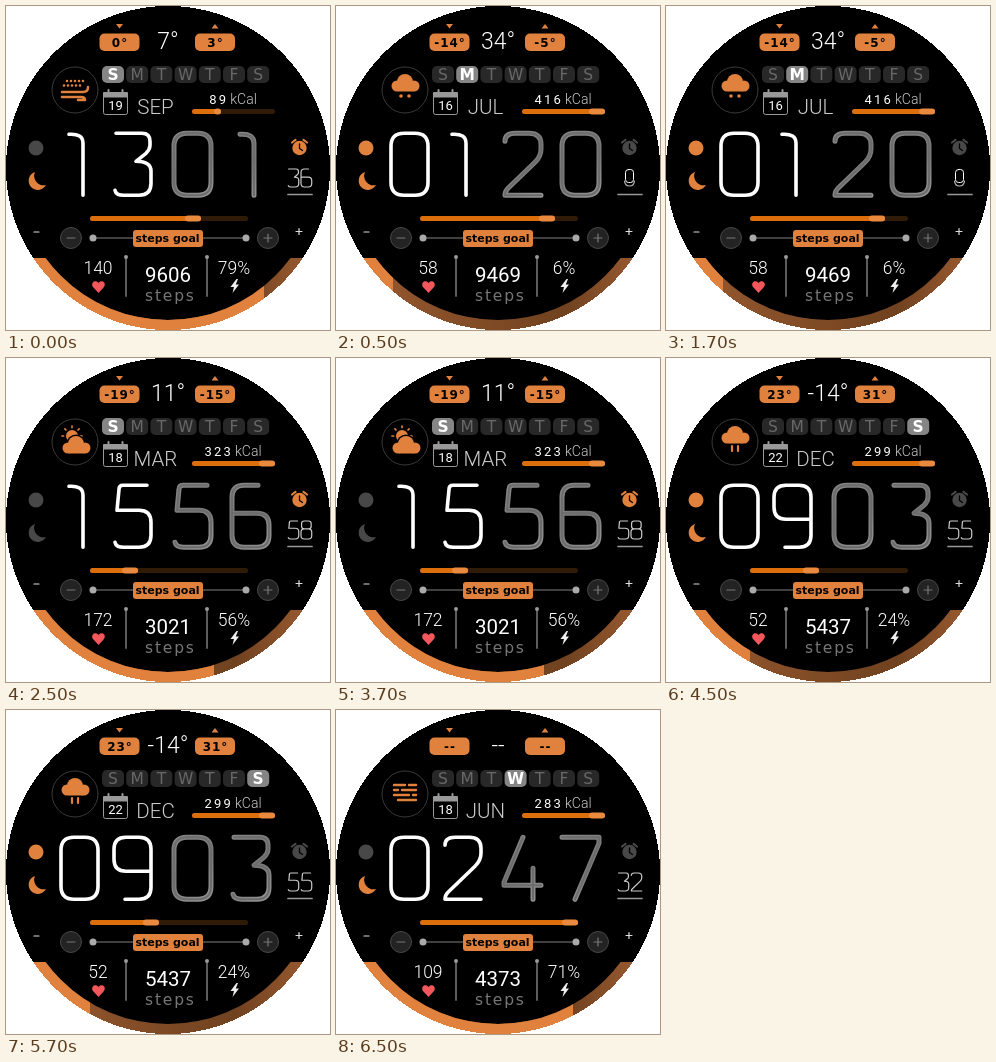
Animation, 324 px wide and 324 px high, one loop 8 s. Source, as an HTML page with a canvas:

```html
<!DOCTYPE html>
<html lang="en">
<head>
<meta charset="utf-8">
<title>Watch face</title>
<style>
html, body { margin: 0; width: 100%; height: 100%; overflow: hidden; background: #fff; }
canvas { display: block; width: 324px; height: 324px; }
</style>
</head>
<body>
<canvas id="face" width="324" height="324"></canvas>
<script>
const ctx = document.getElementById('face').getContext('2d');
const ORANGE = '#e0813d', DEEP = '#dc6f0c', TIP = '#ea8a3f', TRACK = '#301a08', DIM = '#484848';
const SANS = 'Roboto, sans-serif', WIDE = '"DejaVu Sans", sans-serif';

// Digit strokes on a 37 by 62 cell
const DIGITS = [
  'M13 0H24Q37 0 37 13V49Q37 62 24 62H13Q0 62 0 49V13Q0 0 13 0Z',
  'M8 1Q22 0 22 10V62',
  'M1 8Q1 0 11 0H25Q37 0 37 11V16Q37 23 31 29L4 55Q1 58 1 62H37',
  'M2 0H28Q36 0 36 8V12Q36 16 32 20L22 28Q37 28 37 38V50Q37 62 25 62H10Q2 62 1 57',
  'M19 0L0 45V48H37M29 31V62',
  'M33 0H9Q5 0 5 4L3 25H25Q37 25 37 37V50Q37 62 25 62H10Q2 62 1 57',
  'M26 0H12Q0 0 0 12V50Q0 62 12 62H25Q37 62 37 50V40Q37 28 25 28H0',
  'M0 0H37V6L13 62',
  'M11 0H26Q35 0 35 9V18Q35 27 26 27H11Q2 27 2 18V9Q2 0 11 0ZM11 27H26Q37 27 37 38V51Q37 62 26 62H11Q0 62 0 51V38Q0 27 11 27',
  'M11 62H25Q37 62 37 50V12Q37 0 25 0H12Q0 0 0 12V22Q0 34 12 34H37'
].map(d => new Path2D(d));

const STATES = [
  { at: 0, low: '0°', temp: '7°', high: '3°', icon: wind, day: 0, date: 19, month: 'SEP', kcal: 89, burn: 215,
    time: '1301', sec: '36', link: 0, moon: 1, alarm: 1, goal: 195, pulse: 140, steps: 9606, power: 79, edge: 258 },
  { at: 500, low: '-14°', temp: '34°', high: '-5°', icon: snow, day: 1, date: 16, month: 'JUL', kcal: 416, burn: 269,
    time: '0120', sec: '0', link: 1, moon: 1, alarm: 0, goal: 219, pulse: 58, steps: 9469, power: 6, edge: 57 },
  { at: 2500, low: '-19°', temp: '11°', high: '-15°', icon: sunny, day: 0, date: 18, month: 'MAR', kcal: 323, burn: 269,
    time: '1556', sec: '58', link: 0, moon: 0, alarm: 1, goal: 132, pulse: 172, steps: 3021, power: 56, edge: 208 },
  { at: 4500, low: '23°', temp: '-14°', high: '31°', icon: rain, day: 6, date: 22, month: 'DEC', kcal: 299, burn: 269,
    time: '0903', sec: '55', link: 1, moon: 1, alarm: 0, goal: 153, pulse: 52, steps: 5437, power: 24, edge: 84 },
  { at: 6500, low: '--', temp: '--', high: '--', icon: fog, day: 3, date: 18, month: 'JUN', kcal: 283, burn: 269,
    time: '0247', sec: '32', link: 0, moon: 1, alarm: 0, goal: 242, pulse: 109, steps: 4373, power: 71, edge: 237 }
];

function text(str, x, y, font, color, align = 'center', spacing = 0) {
  ctx.font = font;
  ctx.fillStyle = color;
  ctx.textAlign = align;
  ctx.letterSpacing = spacing + 'px';
  ctx.fillText(str, x + (align === 'center' ? spacing / 2 : 0), y);
}

function box(x, y, w, h, r, fill, stroke) {
  ctx.beginPath();
  ctx.roundRect(x, y, w, h, r);
  if (fill) { ctx.fillStyle = fill; ctx.fill(); }
  if (stroke) { ctx.strokeStyle = stroke; ctx.lineWidth = 1; ctx.stroke(); }
}

function disc(x, y, r, fill, stroke) {
  ctx.beginPath();
  ctx.arc(x, y, r, 0, Math.PI * 2);
  if (fill) { ctx.fillStyle = fill; ctx.fill(); }
  if (stroke) { ctx.strokeStyle = stroke; ctx.lineWidth = 1; ctx.stroke(); }
}

function line(d, color, width) {
  ctx.strokeStyle = color;
  ctx.lineWidth = width;
  ctx.stroke(new Path2D(d));
}

function shape(d, color) {
  ctx.fillStyle = color;
  ctx.fill(new Path2D(d));
}

function digit(n, x, y, scale, color, width) {
  const path = new Path2D();
  path.addPath(DIGITS[n], new DOMMatrix([scale, 0, 0, scale, x, y]));
  ctx.strokeStyle = color;
  ctx.lineWidth = width;
  ctx.stroke(path);
}

function bar(x, y, w, h, end, tip) {
  box(x, y, w, h, h / 2, TRACK);
  box(x, y, end - x, h, h / 2, DEEP);
  box(end - tip, y - 0.5, tip, h + 1, 3, TIP);
}

function cloud(x, y) {
  disc(x - 8, y + 1, 5.5, ORANGE);
  disc(x, y - 3, 8, ORANGE);
  disc(x + 9, y + 1, 5.5, ORANGE);
  box(x - 9, y - 1, 19, 7.5, 3, ORANGE);
}

function wind() {
  for (let i = 0; i < 5; i++) {
    disc(61 + i * 4, 75, 1.3, ORANGE);
    disc(58 + i * 4, 79.5, 1.3, ORANGE);
  }
  line('M56 86H77Q82 86 82 81', ORANGE, 2.5);
  line('M56 91H75Q79 91 79 94H72', ORANGE, 2.5);
}

function snow() {
  cloud(69, 79);
  disc(65, 90, 1.8, ORANGE);
  disc(73, 90, 1.8, ORANGE);
}

function sunny() {
  disc(66, 78, 6, ORANGE);
  for (let i = 0; i < 5; i++) {
    const a = Math.PI * (1 + i / 4), c = Math.cos(a), s = Math.sin(a);
    line(`M${66 + 8.5 * c} ${78 + 8.5 * s}L${66 + 10 * c} ${78 + 10 * s}`, ORANGE, 1.7);
  }
  disc(70, 86, 9.5, '#000');
  cloud(70, 89);
}

function rain() {
  cloud(69, 79);
  line('M66 88V93M72 88V93', ORANGE, 2.2);
}

function fog() {
  line('M58 75H69M73 75H80M58 80H62M66 80H80M58 85H73M77 85H80M62 90H80', ORANGE, 2.4);
}

function weatherRow(s) {
  shape('M110 18H117L113.5 22.5Z', ORANGE);
  shape('M205.5 22.5H212.5L209 18Z', ORANGE);
  for (const [x, label] of [[113.5, s.low], [209, s.high]]) {
    box(x - 20, 27.5, 40, 17.5, 5, ORANGE);
    text(label, x, 40.5, 'bold 12px ' + WIDE, '#000', 'center', 1);
  }
  text(s.temp, 162, 43, '300 23px ' + SANS, '#fff');
  disc(69, 84, 23, null, '#3a3a3a');
  s.icon();
}

function dateRows(s) {
  [...'SMTWTFS'].forEach((c, i) => {
    const x = 107 + i * 24.2, on = i === s.day;
    box(x - 11, 60, 22, 17, 5, on ? '#858585' : '#282828');
    text(c, x, 74, (on ? 'bold ' : '') + '15.5px ' + WIDE, on ? '#fff' : '#686868');
  });

  box(97.5, 86.5, 24, 22, 2, null, '#999');
  box(97, 86, 25, 5.5, 1, '#999');
  line('M102.5 84V88M116.5 84V88', '#999', 2);
  text(s.date, 109.5, 103.5, '13px ' + SANS, '#fff');
  text(s.month, 149.5, 107.5, '300 20.5px ' + SANS, '#ccc');

  // Calories: spaced number, then the unit
  const num = '400 13px ' + SANS, unit = '300 14px ' + SANS;
  ctx.letterSpacing = '2.2px';
  ctx.font = num;
  const a = ctx.measureText(s.kcal).width + 2;
  ctx.letterSpacing = '0px';
  ctx.font = unit;
  const left = 227 - (a + ctx.measureText('kCal').width) / 2;
  text(s.kcal, left, 97.5, num, '#fff', 'left', 2.2);
  text('kCal', left + a, 97.5, unit, '#ccc', 'left');
  bar(186, 103, 83, 5, s.burn, s.burn < 269 ? 7 : 16);
}

function clock(s) {
  [55, 108, 168, 226].forEach((x, i) => {
    if (i < 2) return digit(s.time[i], x, 127.3, 1, '#fff', 3.6);
    const g = ctx.createLinearGradient(x, 127, x + 37, 189);
    g.addColorStop(0, '#868686');
    g.addColorStop(0.5, '#777');
    g.addColorStop(1, '#959595');
    digit(s.time[i], x, 127.3, 1, g, 5);
    digit(s.time[i], x, 127.3, 1, '#6c6c6c', 2);
  });

  if (s.sec.length === 1) {
    box(289.5, 163.5, 8, 13, 3, null, '#fff');
    line('M288.5 175Q289 180 293.5 180Q298 180 298.5 175', '#bbb', 1.2);
  } else {
    [...s.sec].forEach((c, i) => digit(c, 282 + i * 13, 163, 0.29, '#ccc', 1.2));
  }
  line('M282 188.5H306', '#999', 1.7);
}

function sideIcons(s) {
  disc(30, 142, 7.5, s.link ? ORANGE : DIM);
  shape('M29 166A9.2 9.2 0 1 0 40 179A9.5 9.5 0 0 1 29 166Z', s.moon ? ORANGE : DIM);

  const c = s.alarm ? ORANGE : DIM;
  disc(293.5, 142, 7.2, c);
  line('M286 136.5L289.5 133.8M297.5 133.8L301 136.5', c, 2.2);
  line('M293.5 138V142.5L296.5 144.5', '#000', 1.3);
}

function goalRow(s) {
  bar(84, 210, 158, 5, s.goal, 16);
  line('M87 232H240', '#808080', 1);
  disc(87, 232, 3.5, '#aaa');
  disc(240, 232, 3.5, '#aaa');
  disc(65, 232, 10.5, '#232323', '#484848');
  disc(262, 232, 10.5, '#232323', '#484848');
  line('M61 232H69M258 232H266M262 228V236', '#777', 1.2);
  line('M28 226H33M290 225.5H296M293 222.5V228.5', '#ddd', 1.2);
  box(127, 224, 70, 17, 3, ORANGE);
  text('steps goal', 161.5, 236, 'bold 11px ' + WIDE, '#000');
}

function stats(s) {
  for (const x of [120, 201]) {
    line(`M${x} 251V290`, '#5c5c5c', 2);
    disc(x, 251, 2, '#999');
  }
  const small = '300 17.5px ' + SANS;
  text(s.pulse, 92, 267.5, small, '#fff');
  text(s.steps, 162, 275.5, '400 20.5px ' + SANS, '#fff');
  text(s.power + '%', 228, 267.5, small, '#fff');
  text('steps', 163.5, 295, '15.5px ' + WIDE, '#777', 'center', 1.8);
  shape('M92.5 287L87 281C84 276 90 273 92.5 277C95 273 101 276 98 281Z', '#f4575b');
  shape('M230.5 273L224.5 281H228L226.5 287L233 278.5H229.8L232 273Z', '#eee');
}

function batteryRing(edge) {
  ctx.save();
  ctx.beginPath();
  ctx.rect(0, 252, 324, 72);
  ctx.clip();
  ctx.beginPath();
  ctx.arc(162, 162, 164, 0, Math.PI * 2);
  ctx.arc(162, 162, 152, 0, Math.PI * 2, true);
  const g = ctx.createLinearGradient(27, 0, 297, 0);
  g.addColorStop(0, '#96582f');
  g.addColorStop(0.75, '#70421f');
  g.addColorStop(1, '#96582f');
  ctx.fillStyle = g;
  ctx.fill();
  ctx.clip();
  ctx.fillStyle = ORANGE;
  ctx.fillRect(0, 252, edge, 72);
  ctx.restore();
}

// Hard-edged round crop, one row at a time
function crop() {
  ctx.fillStyle = '#fff';
  for (let y = 0; y < 324; y++) {
    const half = Math.round(Math.sqrt(162 ** 2 - (y + 0.5 - 162) ** 2));
    ctx.fillRect(0, y, 162 - half, 1);
    ctx.fillRect(162 + half, y, 162 - half, 1);
  }
}

function draw(s) {
  ctx.fillStyle = '#000';
  ctx.fillRect(0, 0, 324, 324);
  ctx.lineCap = ctx.lineJoin = 'round';
  batteryRing(s.edge);
  weatherRow(s);
  dateRows(s);
  clock(s);
  sideIcons(s);
  goalRow(s);
  stats(s);
  crop();
}

const start = performance.now();
function tick() {
  const t = (performance.now() - start) % 8000;
  draw(STATES.findLast(s => s.at <= t));
  requestAnimationFrame(tick);
}
tick();
</script>
</body>
</html>
```
